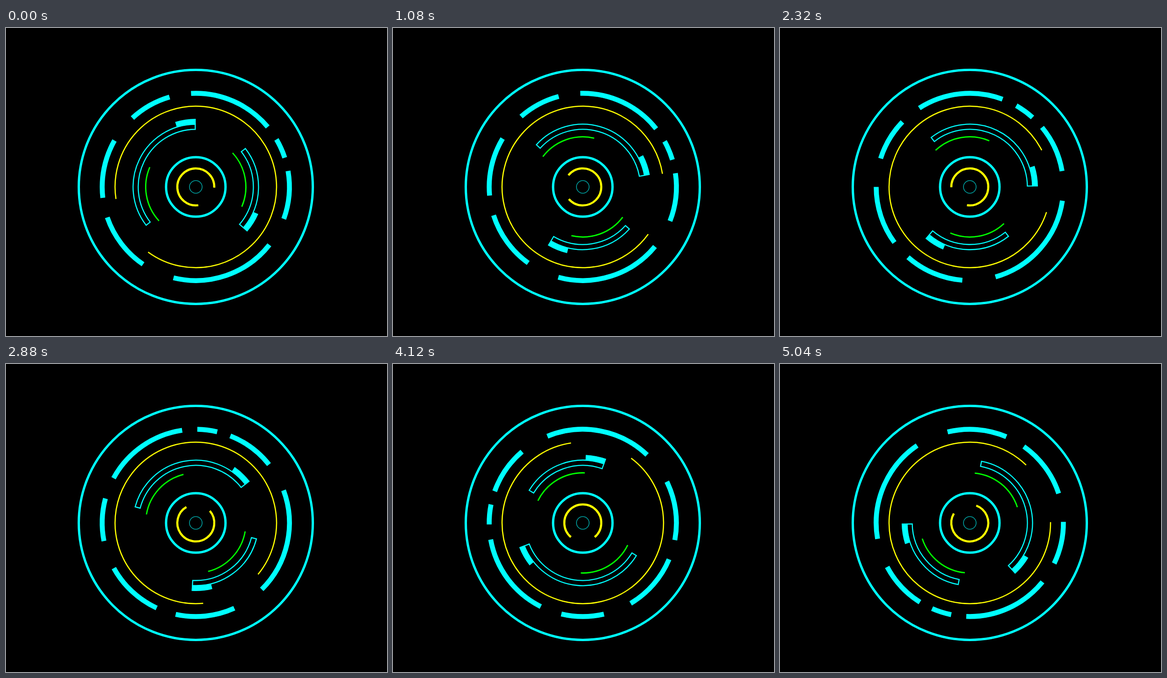
Animation, 814 px wide and 658 px high, one loop 5080 ms. Source, as an HTML page:

```html
<!DOCTYPE html>
<html lang="en">
<head>
<meta charset="utf-8">
<title>Rotating dial</title>
<style>
  html, body { margin: 0; width: 100%; height: 100%; overflow: hidden; background: #000; }
  svg { display: block; width: 814px; height: 658px; }
  path, circle { fill: none; stroke: #0ff; }
  .thin { stroke: #ff0; stroke-width: 2.5; }
  .core { stroke: #ff0; stroke-width: 4.5; }
  .dash { stroke-width: 10.5; }
  .rail { stroke-width: 2.3; }
  .cap { stroke-width: 12; }
  .green { stroke: #0f0; stroke-width: 2.8; }
  .dot { stroke: #00a0a0; stroke-width: 1.6; }
</style>
</head>
<body>
<svg viewBox="0 0 814 658">
  <g transform="translate(405.5 339.5)">
    <circle r="250" stroke-width="5"/>
    <circle r="63.5" stroke-width="5"/>
    <circle r="13.5" class="dot"/>
    <g id="dashes"></g>
    <g id="thin"></g>
    <g id="rails"></g>
    <g id="core"></g>
  </g>
</svg>
<script>
const LOOP = 5080;
const group = id => document.getElementById(id);

// Angles in degrees, clockwise from the right.
function point(r, deg) {
  const a = deg * Math.PI / 180;
  return `${(r * Math.cos(a)).toFixed(3)} ${(r * Math.sin(a)).toFixed(3)}`;
}

function arc(r, from, to) {
  const large = to - from > 180 ? 1 : 0;
  return `M${point(r, from)}A${r} ${r} 0 ${large} 1 ${point(r, to)}`;
}

function band(r1, r2, from, to) {
  const large = to - from > 180 ? 1 : 0;
  return `${arc(r2, from, to)}L${point(r1, to)}A${r1} ${r1} 0 ${large} 0 ${point(r1, from)}Z`;
}

function add(id, cls, d) {
  const path = document.createElementNS('http://www.w3.org/2000/svg', 'path');
  path.setAttribute('class', cls);
  path.setAttribute('d', d);
  group(id).append(path);
}

const dashes = [
  [-89.9, -36.8], [-27.5, -15.2], [-6.8, 23], [41.2, 106.8],
  [127.3, 164], [176.3, 212.7], [230.4, 256.7]
];
for (const [from, to] of dashes) add('dashes', 'dash', arc(200, from, to));

add('thin', 'thin', arc(172.5, 0, 314.8));
add('core', 'core', arc(39.5, 137, 417));

for (const [from, to] of [[242.1, 369.2], [62, 140.3]]) {
  add('rails', 'rail', band(123, 134, from, to));
  add('rails', 'cap', arc(139.5, to - 17.1, to + 0.5));
}
for (const from of [57, 237]) add('rails', 'green', arc(107, from, from + 66));

// cubic-bezier(.42, 0, .58, 1)
function easeInOut(x) {
  let lo = 0, hi = 1;
  for (let i = 0; i < 30; i++) {
    const s = (lo + hi) / 2;
    if (s * (1.26 - 0.78 * s + 0.52 * s * s) < x) lo = s; else hi = s;
  }
  return lo * lo * (3 - 2 * lo);
}

// One turn forward, one turn back, each lasting `period` seconds.
function swing(time, period) {
  const n = Math.floor(time / period);
  const y = easeInOut(time / period - n);
  return 360 * (n % 2 ? 1 - y : y);
}

const periods = { dashes: 7, rails: 4, thin: 3, core: 2 };

// The clock starts slow and settles to a steady rate.
const clock = t => 34.541 + 0.965 * t - 0.32 * (1 - Math.exp(-t / 0.744));

const start = performance.now();
function draw() {
  const time = clock(((performance.now() - start) % LOOP) / 1000);
  for (const id in periods) {
    group(id).setAttribute('transform', `rotate(${swing(time, periods[id]).toFixed(3)})`);
  }
  requestAnimationFrame(draw);
}
draw();
</script>
</body>
</html>
```
